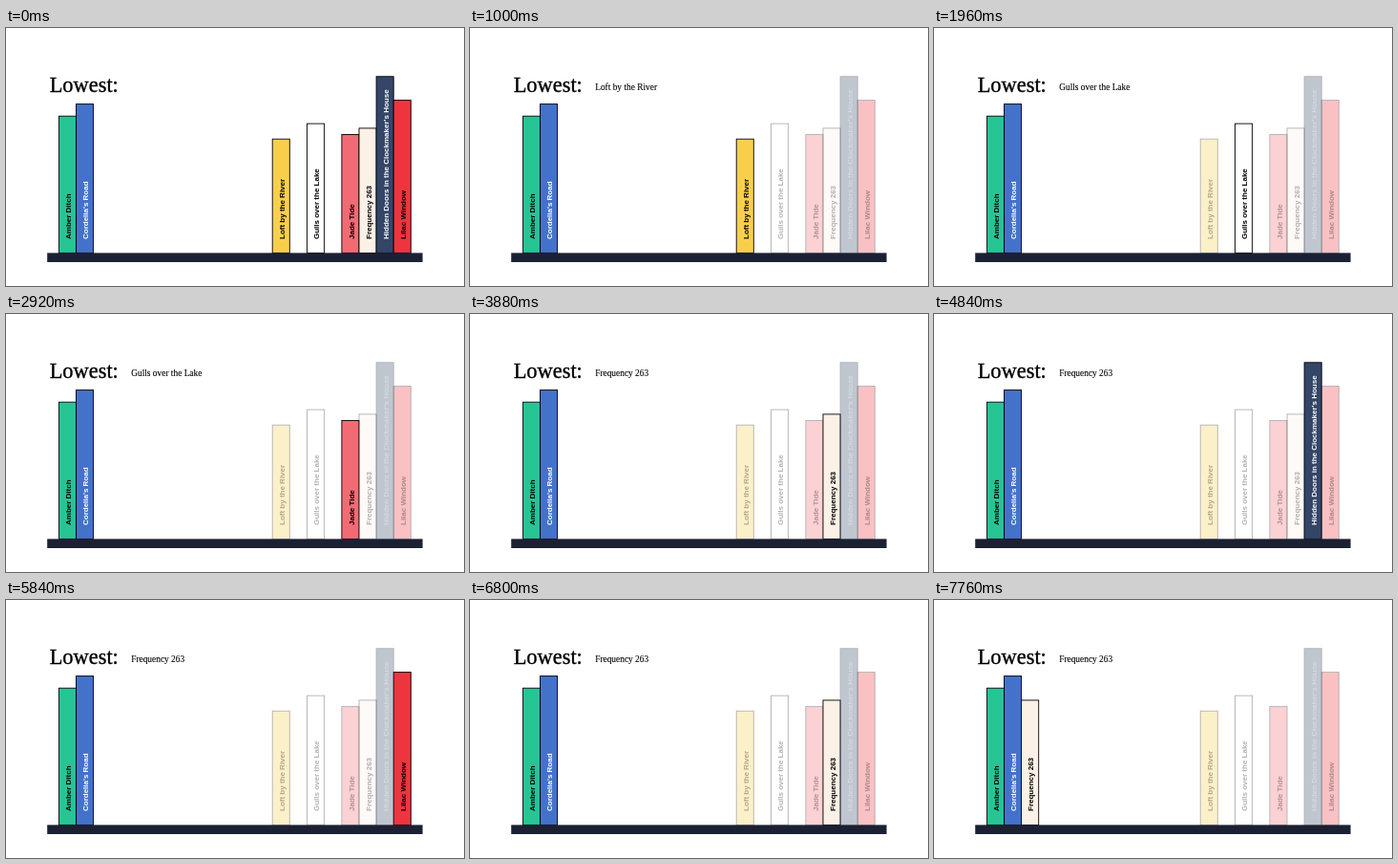
An HTML page for the animation above (8 s loop, 480 px wide and 270 px high).

```html
<!DOCTYPE html>
<html lang="en">
<head>
<meta charset="utf-8">
<title>Selection sort on a bookshelf</title>
<style>
  html, body { margin: 0; width: 100%; height: 100%; overflow: hidden; background: #fff; }
  svg { display: block; width: 100%; height: 100%; }
  .spine { stroke: #000; stroke-width: .9; }
  .title { font: bold 8px "Liberation Sans", Arial, sans-serif; }
  .faded > * { opacity: .3; }
  .serif { font-family: "Liberation Serif", "Times New Roman", serif; }
  .heading { font-size: 22.4px; stroke: #000; stroke-width: .35; }
  .lowest { font-size: 9.4px; stroke: #000; stroke-width: .1; }
</style>
</head>
<body>
<svg viewBox="0 0 480 270">
  <text class="serif heading" x="45.7" y="67.1">Lowest:</text>
  <text class="serif lowest" id="lowest" x="131.2" y="65"></text>
  <g id="books"></g>
  <rect x="43.2" y="235.4" width="393.4" height="9.6" fill="#1c2033"/>
</svg>
<script>
const LOOP = 8000;
const FLOOR = 235.4;
const BOOK_WIDTH = 18.1;

const books = {
  amber:  { title: "Amber Ditch", x: 55.4, top: 92.2, fill: "#27c494", sorted: true },
  road:   { title: "Cordelia's Road", x: 73.5, top: 79.6, fill: "#4472ca", ink: "#fff", sorted: true },
  loft:   { title: "Loft by the River", x: 279.2, top: 116.2, fill: "#f8cf4d" },
  gulls:  { title: "Gulls over the Lake", x: 315.5, top: 100.1, fill: "#fff" },
  jade:   { title: "Jade Tide", x: 351.9, top: 111.5, fill: "#f26b74" },
  freq:   { title: "Frequency 263", x: 370, top: 104.9, fill: "#fcf1e6" },
  hidden: { title: "Hidden Doors in the Clockmaker's House", x: 388.1, top: 50.8, fill: "#334668", ink: "#fff" },
  lilac:  { title: "Lilac Window", x: 406.2, top: 75.6, fill: "#ee343f" },
};

// Each step holds until the next: the book being looked at and the lowest so far.
const steps = [
  { at: 0 },
  { at: 1000, focus: "loft", lowest: "loft" },
  { at: 1960, focus: "gulls", lowest: "gulls" },
  { at: 2920, focus: "jade", lowest: "gulls" },
  { at: 3880, focus: "freq", lowest: "freq" },
  { at: 4840, focus: "hidden", lowest: "freq" },
  { at: 5840, focus: "lilac", lowest: "freq" },
  { at: 6800, focus: "freq", lowest: "freq" },
  { at: 7760, focus: "freq", lowest: "freq", placedAt: 91.6 },
];

function add(parent, tag, attributes, text = "") {
  const node = document.createElementNS("http://www.w3.org/2000/svg", tag);
  for (const [key, value] of Object.entries(attributes)) node.setAttribute(key, value);
  node.textContent = text;
  return parent.appendChild(node);
}

const shelf = document.getElementById("books");
const lowestLabel = document.getElementById("lowest");

for (const book of Object.values(books)) {
  book.node = add(shelf, "g", {});
  add(book.node, "rect", {
    class: "spine", y: book.top, width: BOOK_WIDTH, height: FLOOR - book.top, fill: book.fill,
  });
  add(book.node, "text", {
    class: "title", transform: "translate(12.6 221) rotate(-90)", fill: book.ink || "#000",
  }, book.title);
}

function draw(time) {
  const step = steps.findLast(s => s.at <= time);
  lowestLabel.textContent = step.lowest ? books[step.lowest].title : "";
  for (const [id, book] of Object.entries(books)) {
    const focused = id === step.focus;
    const x = focused && step.placedAt || book.x;
    const solid = !step.focus || focused || book.sorted;
    book.node.setAttribute("transform", `translate(${x} 0)`);
    book.node.classList.toggle("faded", !solid);
  }
}

const start = performance.now();
function tick() {
  draw((performance.now() - start) % LOOP);
  requestAnimationFrame(tick);
}
tick();
</script>
</body>
</html>
```
